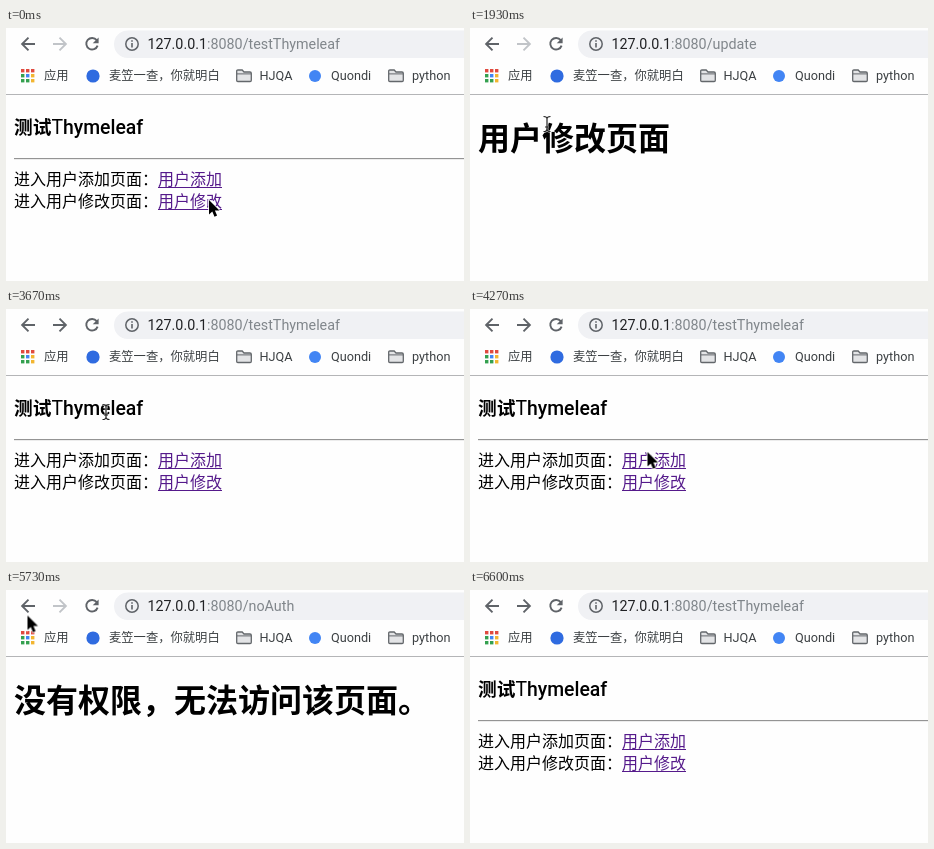
An HTML page for the animation above (6.74 s loop, 458x253 px).

```html
<!DOCTYPE html>
<html lang="zh-CN">
<head>
<meta charset="utf-8">
<title>测试Thymeleaf</title>
<style>
  html, body { margin: 0; width: 100%; height: 100%; overflow: hidden; background: #fefefe; }
  svg { display: block; width: 458px; height: 253px; }
  text { font-family: "Noto Sans CJK SC", "Noto Sans CJK", sans-serif; white-space: pre; }

  .url { font: 14.3px Roboto, sans-serif; fill: #80868b; }
  .url .host { fill: #202124; }
  .marks text { font-family: Roboto, "Noto Sans CJK SC", "Noto Sans CJK", sans-serif; font-size: 12.7px; fill: #3c4043; }
  .marks .cjk { font-size: 12.3px; }
  .body { font-size: 16px; }
  .link { fill: #551a8b; }
  h1, .h1 { font-size: 32px; font-weight: 700; }
  .h3 { font-size: 18.72px; font-weight: 700; }
  .h3 .latin { font-family: Roboto, sans-serif; font-size: 19.4px; font-weight: 500; }
  .h3 .thin { font-weight: 400; }
  .icon { fill: none; stroke: #5f6368; stroke-width: 1.9; }

  .home, .update, .denied, .forward, .arrow, .beam { animation: 6.74s step-end infinite; }
  .home { animation-name: home; }
  .update { animation-name: update; }
  .denied { animation-name: denied; }
  .forward { animation-name: forward; }
  .arrow { animation-name: arrow; }
  .beam { animation-name: beam; }
  .cursor { animation: move 6.74s linear infinite; }

  @keyframes home {
    0%, 48.5%, 89% { opacity: 1; }
    18.82%, 64.2% { opacity: 0; }
    100% { opacity: 1; }
  }
  @keyframes update {
    0%, 48.5%, 100% { opacity: 0; }
    18.82% { opacity: 1; }
  }
  @keyframes denied {
    0%, 89%, 100% { opacity: 0; }
    64.2% { opacity: 1; }
  }
  @keyframes forward {
    0%, 64.2% { stroke: #c1c4c8; }
    48.5%, 89%, 100% { stroke: #5f6368; }
  }
  @keyframes arrow {
    0%, 33.6%, 56.3%, 100% { opacity: 1; }
    28.6%, 53.3% { opacity: 0; }
  }
  @keyframes beam {
    0%, 33.6%, 56.3%, 100% { opacity: 0; }
    28.6%, 53.3% { opacity: 1; }
  }
  @keyframes move {
    0% { transform: translate(203px, 172px); }
    25.7% { transform: translate(203px, 172px); animation-timing-function: steps(3); }
    28.62% { transform: translate(77px, 96px); }
    31.64% { transform: translate(77px, 96px); animation-timing-function: steps(6); }
    37.57% { transform: translate(2px, 50px); animation-timing-function: steps(5); }
    42.5% { transform: translate(16px, 37px); animation-timing-function: steps(3); }
    45.48% { transform: translate(19.5px, 26px); }
    47.46% { transform: translate(19.5px, 26px); animation-timing-function: steps(7); }
    54.38% { transform: translate(100px, 103px); animation-timing-function: steps(4); }
    58.33% { transform: translate(170px, 140px); animation-timing-function: steps(3); }
    61.3% { transform: translate(177.5px, 143px); }
    72.2% { transform: translate(177.5px, 143px); animation-timing-function: steps(8); }
    80.1% { transform: translate(17px, 37px); animation-timing-function: steps(5); }
    85% { transform: translate(21.5px, 25.5px); }
    89% { transform: translate(21.5px, 25.5px); animation-timing-function: steps(9); }
    97.85%, 100% { transform: translate(200px, 257px); }
  }
</style>
</head>
<body>
<svg viewBox="0 0 458 253">
  <defs>
    <path id="left" d="M29 16H16.5M22.5 9.6 16.1 16l6.4 6.4"/>
    <g id="folder">
      <path d="M.7 2.2q0-1.2 1.2-1.2h4.3l1.8 2h6q1.3 0 1.3 1.3v7q0 1.2-1.2 1.2H1.9q-1.2 0-1.2-1.2z" fill="#e3e4e6" stroke="#63676b" stroke-width="1.3"/>
      <path d="M1 4.9h14" stroke="#63676b"/>
    </g>
  </defs>

  <rect width="458" height="253" fill="#fefefe"/>
  <rect x="108" y="2.5" width="380" height="27.5" rx="13.75" fill="#f0f1f4"/>

  <g class="icon">
    <use href="#left"/>
    <use class="forward" href="#left" transform="matrix(-1 0 0 1 76 0)"/>
    <path d="M90.7 12.2A5.8 5.8 0 1 0 91.6 17.6"/>
    <path d="M92.6 9.4v5.9h-5.9z" fill="#5f6368" stroke="none"/>
    <circle cx="126" cy="16" r="6.2" stroke-width="1.5"/>
    <path d="M126 15v4.6M126 12.2v1.6" stroke-width="1.6"/>
  </g>

  <g class="marks">
    <g id="apps"></g>
    <text class="cjk" x="38" y="52.3">应用</text>
    <circle cx="87" cy="48" r="6.6" fill="#2f6be0"/>
    <text class="cjk" x="103" y="52.3">麦笠一查，你就明白</text>
    <use href="#folder" x="230" y="41"/>
    <text x="253.5" y="52.3">HJQA</text>
    <circle cx="309" cy="48" r="6" fill="#4285f4"/>
    <text x="325" y="52.3">Quondi</text>
    <use href="#folder" x="382" y="41"/>
    <text x="406" y="52.3">python</text>
  </g>
  <path d="M0 66.5H458" stroke="#b4b5b7"/>

  <g class="home">
    <text class="url" x="141.5" y="21"><tspan class="host">127.0.0.1</tspan>:8080/testThymeleaf</text>
    <text class="h3" x="8" y="106">测试<tspan class="latin thin">T</tspan><tspan class="latin">hymeleaf</tspan></text>
    <path d="M8 130.5H458" stroke="#949494"/>
    <path d="M8 131.5H458" stroke="#ececec"/>
    <g class="body">
      <text x="8" y="157">进入用户添加页面：<tspan class="link">用户添加</tspan></text>
      <text x="8" y="179">进入用户修改页面：<tspan class="link">用户修改</tspan></text>
      <path d="M152 159.5h64M152 181.5h64" stroke="#551a8b"/>
    </g>
  </g>

  <g class="update">
    <text class="url" x="141.5" y="21"><tspan class="host">127.0.0.1</tspan>:8080/update</text>
    <text class="h1" x="8" y="122">用户修改页面</text>
  </g>

  <g class="denied">
    <text class="url" x="141.5" y="21"><tspan class="host">127.0.0.1</tspan>:8080/noAuth</text>
    <text class="h1" x="8" y="122">没有权限，无法访问该页面。</text>
  </g>

  <g class="cursor">
    <path class="arrow" d="M0 0v14.6l3.3-3.1 2.2 5.2 2.6-1.1-2.2-5h4.6z" stroke="#fff" stroke-width="1.6" paint-order="stroke"/>
    <g class="beam" fill="none">
      <path d="M-3.5-7.5q3.5 0 3.5 2.5 0-2.5 3.5-2.5M0-5.5v11M-3.5 7.5q3.5 0 3.5-2.5 0 2.5 3.5 2.5M-2 3h4" stroke="#fff" stroke-width="2.6" opacity=".7"/>
      <path d="M-3.5-7.5q3.5 0 3.5 2.5 0-2.5 3.5-2.5M0-5.5v11M-3.5 7.5q3.5 0 3.5-2.5 0 2.5 3.5 2.5M-2 3h4" stroke="#222" stroke-width="1.2"/>
    </g>
  </g>
</svg>
<script>
  const red = '#e04a3f', green = '#34a04f', blue = '#4285f4', yellow = '#f2b530';
  const tiles = [red, red, red, green, blue, yellow, green, green, yellow];
  document.getElementById('apps').innerHTML = tiles.map((fill, i) =>
    `<rect x="${15 + i % 3 * 5}" y="${41 + Math.floor(i / 3) * 5}" width="3.4" height="3.4" fill="${fill}"/>`).join('');
</script>
</body>
</html>
```
